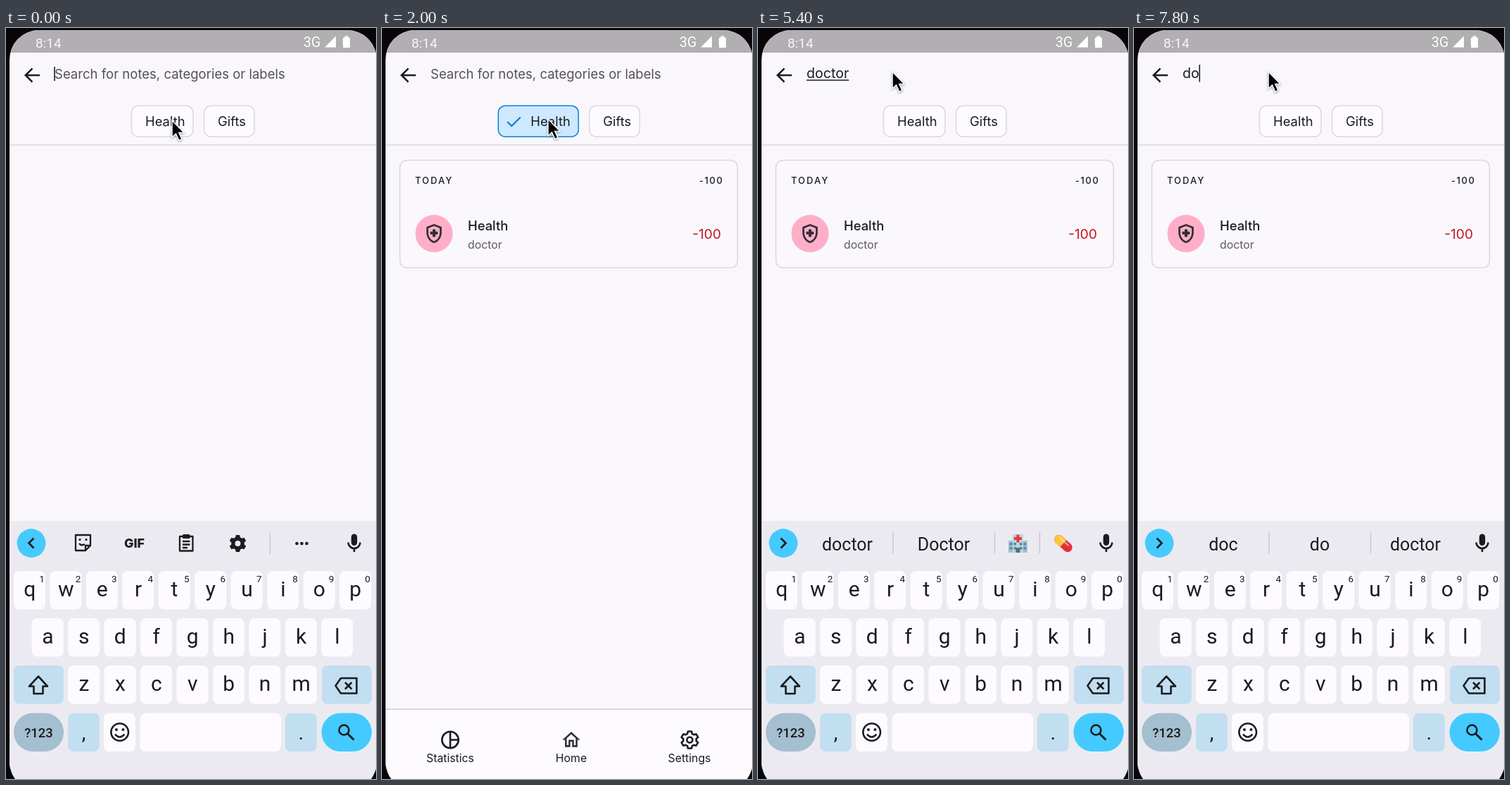
An HTML page that plays this animation: 526 px wide and 1065 px high, repeating every 8 s.

```html
<!DOCTYPE html>
<html lang="en">
<head>
<meta charset="utf-8">
<style>
html, body { margin: 0; width: 100%; height: 100%; overflow: hidden; background: #080508; }
svg { display: block; }
text { font-family: Inter, sans-serif; fill: #1c1b1f; white-space: pre; }
.kb { font-family: Roboto, sans-serif; }
.mid { text-anchor: middle; }
.end { text-anchor: end; }
.line { fill: none; stroke: #1c1b1f; stroke-width: 2.6; }
</style>
</head>
<body>
<svg id="stage" width="526" height="1065" viewBox="0 0 526 1065"></svg>
<script>
const LOOP = 8000, STEP = 200;
const INK = '#1c1b1f', CYAN = '#44caff', PALE = '#c1dff1', KEY = '#fdfbff', PAGE = '#f9f7fb';
const HIDDEN = 370;

// Each scene changes part of the state from its time on.
const scenes = [
  [0, { kb: 0, sel: '', text: '', caret: 1, under: 0, x: 236, y: 131 }],
  [200, { sel: 'Health' }],
  [400, { kb: 250, caret: 0 }],
  [600, { kb: HIDDEN, x: 262, y: 130 }],
  [800, { x: 325, y: 126 }],
  [1000, { x: 349, y: 124 }],
  [1200, { sel: 'Health Gifts' }],
  [1600, { sel: 'Health', x: 345, y: 125 }],
  [1800, { x: 285, y: 127 }],
  [2000, { x: 236, y: 129 }],
  [2200, { sel: '', x: 232, y: 127 }],
  [2400, { x: 205, y: 70 }],
  [2600, { x: 191, y: 62, caret: 1 }],
  [2800, { kb: 32 }],
  [3000, { kb: 0 }],
  [3200, { text: 'd', under: 1 }],
  [3400, { text: 'do' }],
  [3600, { text: 'doc' }],
  [4000, { text: 'doct' }],
  [4200, { text: 'docto' }],
  [4400, { text: 'doctor' }],
  [5200, { caret: 0 }],
  [5600, { caret: 1 }],
  [6000, { caret: 0, under: 0 }],
  [6200, { kb: 190 }],
  [6400, { kb: HIDDEN }],
  [7200, { kb: 32, caret: 1 }],
  [7400, { kb: 0 }],
  [7600, { text: 'doct' }],
  [7800, { text: 'do' }],
];

const records = [
  { name: 'Gifts', note: 'friends', cost: 1000, tint: '#e1b0e2' },
  { name: 'Health', note: 'doctor', cost: 100, tint: '#ffaec8' },
];

const hints = {
  d: ['do', "don't", 'did'],
  do: ['doc', 'do', 'doctor'],
  doc: ['doc', 'do', 'doctor'],
  doct: ['doct', 'doctor', 'doctors'],
  docto: ['docto', 'doctor', 'doctors'],
  doctor: ['doctor', 'Doctor'],
};

const text = (x, y, size, str, attrs = '') =>
  `<text x="${x}" y="${y}" font-size="${size}" ${attrs}>${str}</text>`;
const rect = (x, y, w, h, r, fill, stroke = 'none') =>
  `<rect x="${x}" y="${y}" width="${w}" height="${h}" rx="${r}" fill="${fill}" stroke="${stroke}" stroke-width="1.5"/>`;
const dot = (x, y, r, fill = INK) => `<circle cx="${x}" cy="${y}" r="${r}" fill="${fill}"/>`;
const ring = (x, y, r, w = 2.6) => `<circle class="line" cx="${x}" cy="${y}" r="${r}" style="stroke-width:${w}"/>`;
const line = (d, style = '') => `<path class="line" d="${d}" style="${style}"/>`;
const shape = (d, fill = INK) => `<path d="${d}" fill="${fill}" fill-rule="evenodd"/>`;
const icon = (x, y, scale, d) =>
  `<g transform="translate(${x} ${y}) scale(${scale}) translate(-12 -12)">${shape(d, '#313035')}</g>`;
const rule = (x, y = 715) => rect(x - .7, y, 1.4, 30, 0, '#c6c4cc');

const giftPath = 'M20 6h-2.2a3 3 0 0 0-5.3-2.7l-.5.7-.5-.7A3 3 0 0 0 6.2 6H4a2 2 0 0 0-2 2v11a2 2 0 0 0 2 2h16a2 2 0 0 0 2-2V8a2 2 0 0 0-2-2z' +
  'M15 4a1 1 0 1 1 0 2 1 1 0 0 1 0-2zM9 4a1 1 0 1 1 0 2 1 1 0 0 1 0-2zM20 19H4v-2h16zM20 14H4V8h5.1L7 10.8 8.6 12 12 7.4 15.4 12 17 10.8 14.9 8H20z';
const shieldPath = 'M10.5 13H8v-3h2.5V7.5h3V10H16v3h-2.5v2.5h-3zM12 2L4 5v6.1c0 5 3.4 9.8 8 10.9 4.6-1.1 8-5.9 8-10.9V5z' +
  'M18 11.1c0 4-2.5 7.7-6 8.8-3.5-1.1-6-4.8-6-8.8V6.4l6-2.3 6 2.3z';
const homePath = 'M12 5.7l5 4.5V18h-2v-6H9v6H7v-7.8zM12 3L2 12h3v8h6v-6h2v6h6v-8h3z';

// Six-toothed wheel
function gear(x, y, r) {
  const pts = [];
  for (let k = 0; k < 6; k++)
    for (const [deg, len] of [[-21, .76], [-12, 1], [12, 1], [21, .76]]) {
      const a = (k * 60 - 90 + deg) * Math.PI / 180;
      pts.push((x + r * len * Math.cos(a)).toFixed(1) + ' ' + (y + r * len * Math.sin(a)).toFixed(1));
    }
  return 'M' + pts.join('L') + 'Z';
}

function statusBar() {
  return rect(5, 3, 522, 32, 0, '#b2afb2') +
    text(42, 27.5, 19, '8:14', 'class="kb" style="fill:#f8f6f8"') +
    text(423, 27, 19.4, '3G', 'class="kb" style="fill:#fff"') +
    shape('M453 27.5h16v-16z', '#fff') + rect(479, 13.5, 10, 14.5, 1.5, '#fff') + rect(481.5, 11.5, 5, 3, 0, '#fff');
}

function searchBar(s) {
  const field = s.text
    ? text(69, 70.5, 19.6, s.text, 'id="typed"') + (s.under ? '<path id="under" stroke="#1c1b1f" stroke-width="1.4"/>' : '')
    : text(69, 72, 18.55, 'Search for notes, categories or labels', 'style="fill:#545157"');
  const caret = s.caret ? '<path id="caret" stroke="#1c1b1f" stroke-width="1.6"/>' : '';
  return line('M48 67H28M37.5 57.3L27.8 67l9.7 9.7') + field + caret;
}

function chips(sel) {
  const list = [['Health', 87.5], ['Gifts', 71.5]].map(([name, w]) => {
    const on = sel.includes(name);
    return { name, on, w: on ? w + 26.5 : w };
  });
  let x = 265.8 - (list[0].w + list[1].w + 15.5) / 2;
  return list.map(({ name, on, w }) => {
    const out = rect(x, 110.2, w, 44, 10, on ? '#cde8ff' : '#fdfbff', on ? '#0b86cf' : '#dbd8dd') +
      (on ? line(`M${x + 13} 133l6 6 12.5-12.5`, 'stroke:#0a78d1;stroke-width:2.1') : '') +
      text(x + (on ? 46 : 19.5), 139.3, 18.4, name);
    x += w + 15.5;
    return out;
  }).join('') + rect(5, 165, 521, 1.6, 0, '#dddadf');
}

function card(s) {
  const shown = records.filter(r => s.text ? r.note.includes(s.text) : s.sel.includes(r.name));
  if (!shown.length) return '';
  const total = shown.reduce((sum, r) => sum + r.cost, 0);
  return rect(25.5, 187.5, 480, 57 + 95.5 * shown.length, 10, '#faf8fc', '#dad7dc') +
    text(47, 221, 13, 'TODAY', 'font-weight="500" letter-spacing="2"') +
    text(485.5, 221, 13, '-' + total, 'class="end" font-weight="500" letter-spacing="1.6"') +
    shown.map((r, i) => `<g transform="translate(0 ${95.5 * i})">` +
      dot(74, 291.5, 26.6, r.tint) + icon(74, 291.5, 1.35, r.name == 'Gifts' ? giftPath : shieldPath) +
      text(122, 286.5, 18.4, r.name, 'font-weight="500"') +
      text(122, 313, 15.8, r.note, 'style="fill:#5e5b61"') +
      text(482, 299, 19.2, '-' + r.cost, 'class="end" style="fill:#c8151d"') + '</g>').join('');
}

function navBar() {
  return rect(5, 966, 521, 100, 0, '#fdfbff') + rect(5, 965, 521, 2, 0, '#d9d6da') +
    ring(97, 1009.5, 11.7) + line('M97 998v23M97 1009.5h11.5') +
    icon(269, 1009.5, 1.27, homePath) +
    line(gear(437.5, 1009.5, 12.3), 'stroke-linejoin:round') + ring(437.5, 1009.5, 4) +
    [[97, 'Statistics'], [269, 'Home'], [437, 'Settings']]
      .map(([x, name]) => text(x, 1041, 15.8, name, 'class="mid"')).join('');
}

function toolbar() {
  return line('M99 719h21v15l-7 7h-14zM120 734h-7v7M104 731q3 4 8 1', 'stroke-width:2.3;stroke-linejoin:round') +
    dot(105, 725.5, 1.6) + dot(114, 725.5, 1.6) +
    text(182.5, 737, 18, 'GIF', 'class="mid" font-weight="800"') +
    line('M247 721h18.5v20.5H247zM251 728h10.500M251 732.500h10.500M251 737h7', 'stroke-width:2.3;stroke-linejoin:round') +
    rect(251, 718, 10.5, 6, 1.5, INK) +
    shape(gear(329.5, 731, 12.3) + 'M329.500 727a4 4 0 1 0 0 8a4 4 0 0 0 0-8z') +
    rule(375.5, 716) + [413.5, 420.5, 427.5].map(x => dot(x, 731, 2.3)).join('');
}

function emojis() {
  const windows = [358, 363.5, 372, 377.5].map(x =>
    [730, 736].map(y => rect(x, y, 3.5, 3.5, 0, '#3e8fb5')).join('')).join('');
  return rule(400.5) +
    rect(356, 727, 27, 17, 1, '#a9bdc6') + rect(362, 718, 15, 26, 1, '#c3d2d9') + windows +
    rect(366.5, 737, 6, 7, 0, '#55707d') +
    line('M369.5 718.500v11M364 724h11', 'stroke:#e43b3f;stroke-width:4') +
    `<g transform="translate(434 731) rotate(42)">${rect(-15, -6.5, 30, 13, 6.5, '#e5303a')}` +
    shape('M0-6.500H-8.500a6.500 6.500 0 0 0 0 13H0z', '#fbc53a') + rect(-10, -4, 18, 2.5, 1.2, '#ffffff77') + '</g>';
}

function suggestions(words) {
  return words.map((w, i) => text([127, 264, 400][i], 740.5, 25, w, 'class="kb mid"')).join('') +
    rule(192) + rule(336.5) + (words.length < 3 ? emojis() : '');
}

function keys() {
  const pitch = 51.45;
  const key = (x, y, w = 45, fill = KEY, r = 8) => rect(x, y, w, 54.5, r, fill);
  const row = (letters, x0, y) => [...letters].map((c, i) => {
    const x = x0 + i * pitch;
    return key(x, y) + text(x + 22.7, y + 36, 30, c, 'class="kb mid"');
  }).join('');
  return row('qwertyuiop', 11, 770) + row('asdfghjkl', 36.7, 837) + row('zxcvbnm', 88.2, 904) +
    [...'1234567890'].map((n, i) => text(51 + i * pitch, 785.5, 13.5, n, 'class="kb mid"')).join('') +
    key(11, 904, 71, PALE) + line('M46 919.500L33 933.500h6.500v10.500h13v-10.500h6.500z', 'stroke-linejoin:round') +
    key(449, 904, 71, PALE) + line('M476 922h22.500v21.500H476l-7.500-10.700zM482 928l9.500 9.500m0-9.500l-9.500 9.500', 'stroke-linejoin:round') +
    key(11, 971.5, 71, '#a3bfd0', 27) + text(46.5, 1006, 18.5, '?123', 'class="kb mid" font-weight="500"') +
    key(88, 971.5, 45, PALE) + text(110.5, 1009, 28, ',', 'class="kb mid"') +
    key(139, 971.5) + ring(161.7, 998.5, 12.3) + dot(157, 995, 2) + dot(166.5, 995, 2) + line('M155 1001.500q6.700 8 13.400 0') +
    key(190.5, 971.5, 200.5) +
    key(397, 971.5, 45, PALE) + text(419.5, 1009, 28, '.', 'class="kb mid"') +
    key(448.5, 971.5, 71.5, CYAN, 27) + ring(480.5, 995.5, 7) + line('M485.500 1000.500l9 9', 'stroke-width:3');
}

function keyboard(s) {
  if (s.kb >= HIDDEN) return '';
  const words = hints[s.text];
  return `<g transform="translate(0 ${s.kb})">` + rect(5, 699, 521, 380, 0, '#eceaf1') +
    dot(36, 730.5, 20.4, CYAN) + line(words ? 'M32.500 723.500l7 7-7 7' : 'M39.500 723.500l-7 7 7 7') +
    (words ? suggestions(words) : toolbar()) +
    rect(490.8, 717.5, 8.4, 16.5, 4.2, INK) + line('M486.500 729.500a8.500 8.500 0 0 0 17 0M495 738v5') +
    keys() + '</g>';
}

const pointer = ({ x, y }) =>
  `<path transform="translate(${x} ${y})" d="M0 0v24l5.500-5 4.300 9.500 4.200-2-4.200-9h7.400z" fill="#000" stroke="#fff" stroke-width="1.5" style="filter:drop-shadow(0 1.500px 1.500px #0006)"/>`;

const stage = document.getElementById('stage');
const pick = id => document.getElementById(id);

function render(time) {
  const s = Object.assign({}, ...scenes.filter(([from]) => from <= time).map(([, change]) => change));
  stage.innerHTML = '<clipPath id="screen"><rect x="5" y="3" width="522" height="1079" rx="42"/></clipPath>' +
    '<g clip-path="url(#screen)">' + rect(5, 3, 522, 1079, 0, PAGE) + statusBar() + searchBar(s) +
    chips(s.sel) + card(s) + navBar() + keyboard(s) + '</g>' + pointer(s);
  const end = 69 + (s.text ? pick('typed').getComputedTextLength() : 0);
  if (s.caret) pick('caret').setAttribute('d', s.text ? `M${end + .5} 52v24.500` : 'M69 55v20');
  if (s.under && s.text) pick('under').setAttribute('d', `M69 74H${end}`);
}

let last = -1;
function tick() {
  const time = Math.floor(performance.now() % LOOP / STEP) * STEP;
  if (time !== last) render(last = time);
  requestAnimationFrame(tick);
}
tick();
</script>
</body>
</html>
```
